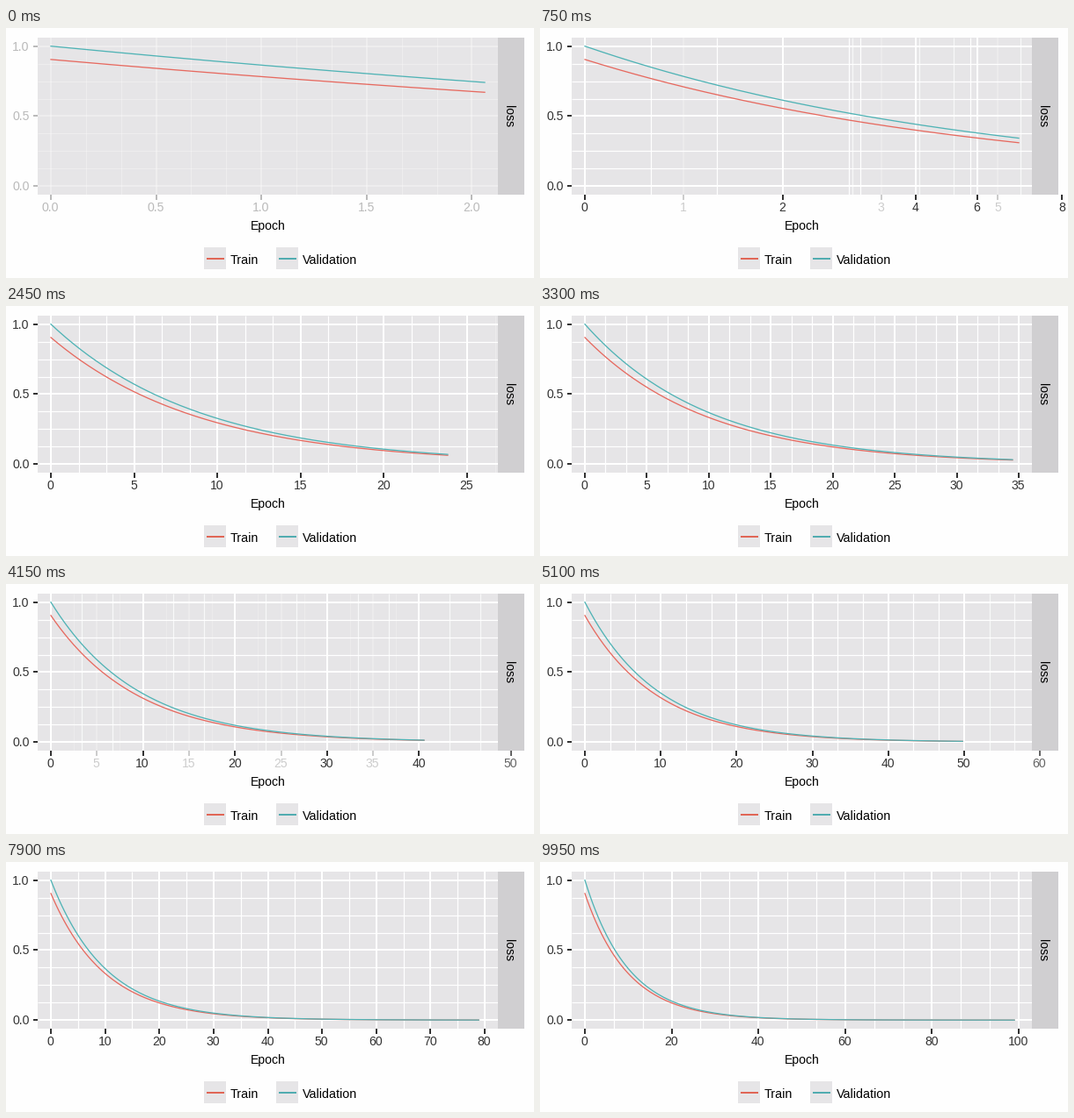
Recreate the animation shown at these times as a matplotlib script. Size 600 by 285 pixels, loop 10 s.

```python
import math

import numpy as np
import matplotlib.pyplot as plt
from matplotlib.animation import FuncAnimation
from matplotlib.collections import LineCollection
from matplotlib.colors import to_rgb
from matplotlib.patches import Rectangle

W, H, DPI = 600, 285, 100
FRAMES, INTERVAL = 200, 50
LEFT, RIGHT, TOP, BOTTOM = 36, 559, 11, 190
X0, SPAN = 51, 493
Y0, YSPAN = 180.2, 159.5
TICK_COUNT = 5.7
MOVE, LINE_MOVE = 8, 4.4      # transition lengths in frames
REST = 3                      # shortest time between two scale changes
FIRST_FADE = 0.3              # fade already done when the loop begins
PX = 72 / DPI

PANEL, STRIP = "#e6e5e7", "#d0cfd1"
INK = "#333333"
TRAIN, VALID = "#e6695f", "#4fb3b5"

plt.rcParams["font.family"] = "Liberation Sans"
plt.rcParams["font.size"] = 14 * PX

# Training progress: (frame, epoch)
PROGRESS = [(0, 3), (17.5, 12), (22.5, 14), (27.5, 16), (30, 18), (46, 25),
            (49, 26.7), (78, 40), (83, 43), (118, 60), (121, 60.9),
            (147, 70), (158, 78.9), (197, 99)]


def epoch_at(frame):
    return float(np.interp(frame, *zip(*PROGRESS)))


def ease(p):
    p = min(p, 1)
    return (2 * p) ** 2.5 / 2 if p < 0.5 else 1 - (2 - 2 * p) ** 2.5 / 2


def tick_step(top):
    raw = top / TICK_COUNT
    power = 10.0 ** math.floor(math.log10(raw))
    ratio = raw / power
    for limit, factor in ((50, 10), (10, 5), (2, 2)):
        if ratio >= math.sqrt(limit):
            return power * factor
    return power


def nice_top(epoch):
    step = tick_step(epoch)
    return round(math.ceil(epoch / step - 1e-6) * step, 4)


def x_pos(value, top):
    return X0 + SPAN * value / top


def y_pos(value):
    return Y0 - YSPAN * value


def split_ticks(top):
    """Major and minor tick values of an axis from 0 to top."""
    step = tick_step(top)
    parts = 1 + int(SPAN * step / top // 35)
    count = round(top / step) * parts
    values = [round(i * step / parts, 4) for i in range(count + 1)]
    majors = set(values[::parts])
    return majors, set(values) - majors


class Marks:
    """Ticks that slide to the newest scale while fading in or out."""

    def __init__(self):
        self.items = {}
        self.active = set()

    def retarget(self, values, old_top, fade):
        for mark in self.items.values():
            mark["start"] = mark["x"]
        for v in values - self.items.keys():
            x = x_pos(v, old_top)
            self.items[v] = {"start": x, "x": x, "fade": fade}
        self.active = values

    def advance(self, top, k):
        for v, mark in list(self.items.items()):
            mark["x"] = mark["start"] + (x_pos(v, top) - mark["start"]) * k
            change = 1 / MOVE if v in self.active else -1 / MOVE
            mark["fade"] = min(1, mark["fade"] + change)
            if mark["fade"] <= 0.001:
                del self.items[v]

    def snapshot(self):
        return [(v, m["x"], ease(m["fade"]))
                for v, m in sorted(self.items.items())]


def simulate():
    majors, minors = Marks(), Marks()
    top, scale, scale_start, age = 2, 3, 3, REST
    states = []
    for frame in range(FRAMES):
        epoch = epoch_at(frame)
        new_top = nice_top(math.ceil(epoch - 1e-6))
        if new_top != top and age >= REST:
            first = frame == 0
            for marks, values in zip((majors, minors), split_ticks(new_top)):
                marks.retarget(values, top, FIRST_FADE if first else 0)
            top, scale_start, age = new_top, scale, int(first)
        age += 1
        majors.advance(top, ease(age / MOVE))
        minors.advance(top, ease(age / MOVE))
        scale = scale_start + (top - scale_start) * ease(age / LINE_MOVE)
        scale = max(scale, epoch)
        states.append((epoch, scale, tick_step(top),
                       majors.snapshot(), minors.snapshot()))
    return states


STATES = simulate()

fig = plt.figure(figsize=(W / DPI, H / DPI), dpi=DPI, facecolor="#fefefe")
ax = fig.add_axes([0, 0, 1, 1])
ax.set_xlim(0, W)
ax.set_ylim(H, 0)
ax.axis("off")


def box(x, y, w, h, color):
    patch = Rectangle((x, y), w, h, facecolor=color, linewidth=0)
    ax.add_patch(patch)
    return patch


def lines(width, zorder):
    group = LineCollection([], linewidths=width * PX, zorder=zorder,
                           capstyle="butt")
    ax.add_collection(group, autolim=False)
    return group


panel = box(LEFT, TOP, RIGHT - LEFT, BOTTOM - TOP, PANEL)
box(RIGHT, TOP, 30, BOTTOM - TOP, STRIP)
ax.text(571, 101, "loss", rotation=270, ha="center", va="center")
ax.text(297.5, 230, "Epoch", ha="center", va="baseline")

for x, name, color in ((225, "Train", "#e0604f"), (307, "Validation", "#4aa9ae")):
    box(x, 250, 25, 25, PANEL)
    ax.plot([x + 2.5, x + 22.5], [262.5, 262.5], color=color,
            lw=1.9 * PX, solid_capstyle="butt")
    ax.text(x + 30, 269, name, va="baseline", fontsize=14.3 * PX)

minor_grid, major_grid, tick_marks = lines(1.2, 2), lines(2, 2.1), lines(2, 3)
curves = [ax.plot([], [], color=c, lw=1.3 * PX, zorder=4)[0]
          for c in (TRAIN, VALID)]
for artist in (minor_grid, major_grid, *curves):
    artist.set_clip_path(panel)

x_labels = [ax.text(0, 209, "", ha="center", va="baseline", color=INK)
            for _ in range(40)]
Y_MAJOR = (0, 0.5, 1)
Y_MINOR = [i / 8 for i in range(9) if i % 4]
y_labels = [ax.text(26.5, y_pos(v) + 5, f"{v:.1f}", ha="right",
                    va="baseline", color=INK) for v in Y_MAJOR]


def fill(group, items, color):
    """Items are (segment, alpha) pairs."""
    group.set_segments([seg for seg, _ in items])
    group.set_color([(*to_rgb(color), alpha) for _, alpha in items])


def grid(x_items, y_values, y_alpha):
    items = [([(x, TOP), (x, BOTTOM)], a) for _, x, a in x_items]
    items += [([(LEFT, y_pos(v)), (RIGHT, y_pos(v))], y_alpha)
              for v in y_values]
    return items


def draw(frame):
    epoch, scale, step, majors, minors = STATES[frame]
    y_alpha = ease(FIRST_FADE + (frame + 1) / MOVE)

    fill(minor_grid, grid(minors, Y_MINOR, y_alpha), "white")
    fill(major_grid, grid(majors, Y_MAJOR, y_alpha), "white")
    marks = [([(x, BOTTOM), (x, BOTTOM + 5.5)], a) for _, x, a in majors]
    marks += [([(LEFT - 5.5, y_pos(v)), (LEFT, y_pos(v))], y_alpha)
              for v in Y_MAJOR]
    fill(tick_marks, marks, INK)

    for label in x_labels:
        label.set_visible(False)
    for label, (v, x, alpha) in zip(x_labels, majors):
        if x < W + 20:
            label.set_text(f"{v:.1f}" if step < 1 else f"{v:g}")
            label.set_x(x - 0.5)
            label.set_alpha(alpha)
            label.set_visible(True)
    for label in y_labels:
        label.set_alpha(y_alpha)

    e = np.linspace(0, epoch, 160)
    for curve, delay in zip(curves, (1, 0)):
        curve.set_data(x_pos(e, scale), y_pos(np.exp(-(e + delay) / 10)))
    return [minor_grid, major_grid, tick_marks, *curves, *x_labels, *y_labels]


anim = FuncAnimation(fig, draw, frames=FRAMES, interval=INTERVAL,
                     init_func=lambda: draw(0), repeat=True, repeat_delay=0,
                     blit=False)
plt.show()
```
